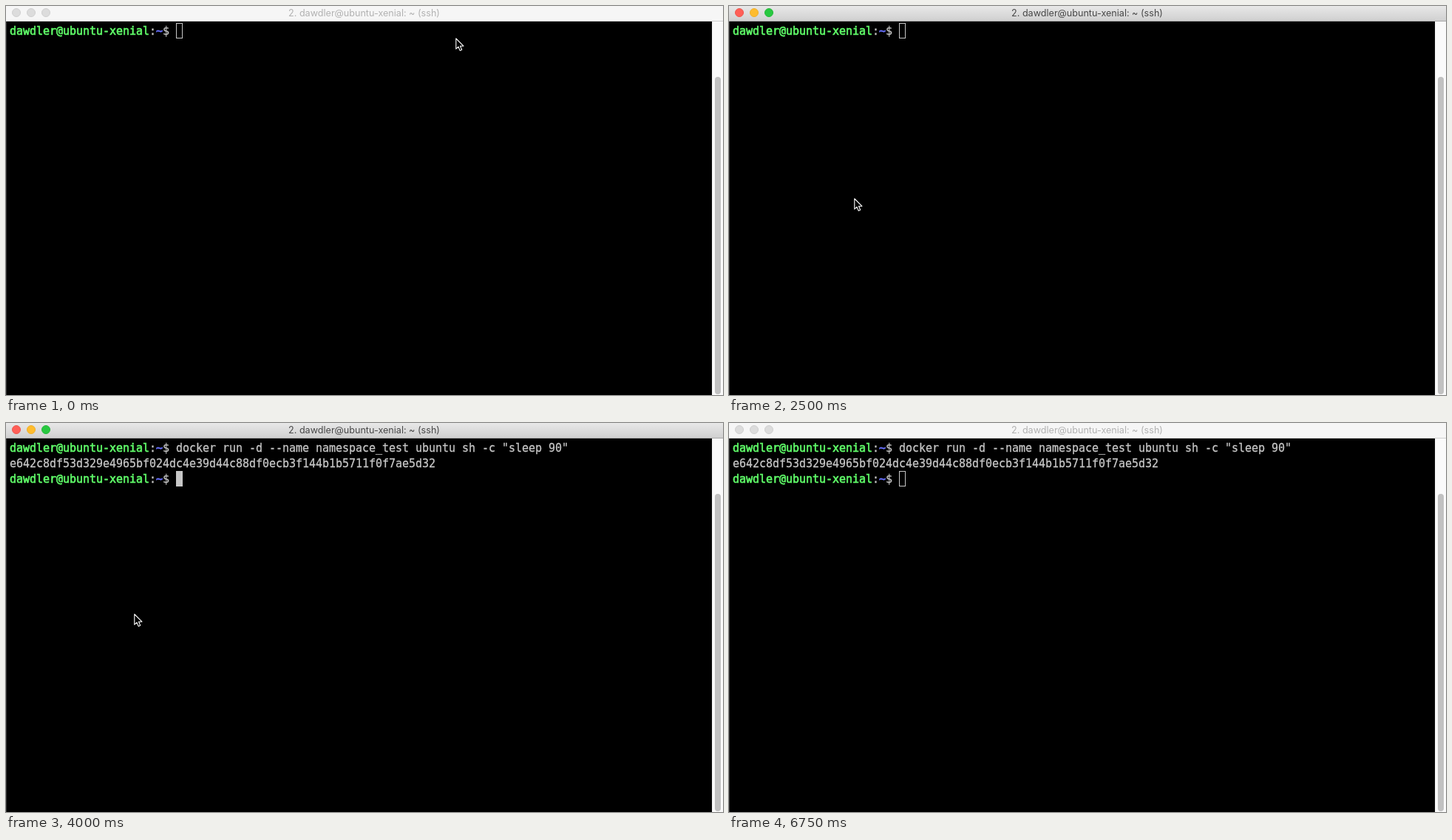
Recreate the animation shown at these times as an HTML page. Size 970 px wide and 527 px high, loop 8 s.

```html
<!DOCTYPE html>
<html lang="en">
<head>
<meta charset="utf-8">
<title>Terminal</title>
<style>
html, body { margin: 0; width: 100%; height: 100%; overflow: hidden; background: #000; }
#stage { position: relative; width: 970px; height: 527px; overflow: hidden; background: #000; }
#stage > * { position: absolute; box-sizing: border-box; }
#bar {
  left: 0; top: 0; width: 970px; height: 21px;
  background: #f6f6f6; border-bottom: 1px solid #d0d0d0;
  font: 12.6px/19px Inter, Roboto, sans-serif; text-align: center; color: #b2b2b2;
}
#bar span { position: absolute; left: 0; width: 969px; top: 0; white-space: pre; }
#bar i {
  position: absolute; top: 3px; width: 12px; height: 12px; border-radius: 50%;
  box-sizing: border-box; background: #dcdcdc; border: 1px solid #d0d0d0;
}
.active #bar { background: linear-gradient(#e8e8e8, #d0d0d0); border-color: #a8a8a8; color: #484848; }
.active #bar i { background: var(--on); border-color: var(--rim); }
#edge { left: 0; top: 21px; width: 1px; height: 506px; background: #303030; }
#track { left: 955px; top: 21px; width: 15px; height: 506px; background: #fafafa; border-left: 1px solid #ededed; }
#thumb { left: 959px; top: 96px; width: 8px; height: 430px; border-radius: 4px; background: #c1c1c1; }
.line {
  left: 5px; height: 21px; white-space: pre; color: #c7c7c7;
  font: 15px/21px "DejaVu Sans Mono", monospace; letter-spacing: -0.031px;
  -webkit-text-stroke: 0.3px;
}
.line b { color: #5ffa68; font-weight: normal; -webkit-text-stroke-width: 0.7px; }
.line .home { color: #6871ff; }
#caret { width: 9px; height: 21px; border: 1px solid #c7c7c7; }
#caret.solid { background: #c7c7c7; }
#mouse { left: 0; top: 0; width: 13px; height: 19px; overflow: visible; }
</style>
</head>
<body>
<div id="stage">
  <div id="bar">
    <i style="left:8px;--on:#ff5f57;--rim:#f0544c"></i>
    <i style="left:28px;--on:#febc2e;--rim:#f0b02a"></i>
    <i style="left:48px;--on:#28c840;--rim:#22ba37"></i>
    <span>2. dawdler@ubuntu-xenial: ~ (ssh)</span>
  </div>
  <div id="edge"></div>
  <div id="track"></div>
  <div id="thumb"></div>
  <div class="line" style="top:24px"><b>dawdler@ubuntu-xenial</b>:<b class="home">~</b>$ <span id="command">docker run -d --name namespace_test ubuntu sh -c "sleep 90"</span></div>
  <div class="line" style="top:45px" id="output">e642c8df53d329e4965bf024dc4e39d44c88df0ecb3f144b1b5711f0f7ae5d32</div>
  <div class="line" style="top:66px" id="prompt"><b>dawdler@ubuntu-xenial</b>:<b class="home">~</b>$ </div>
  <div id="caret"></div>
  <svg id="mouse" viewBox="0 0 13 19">
    <path d="M.8 1V15.2L4 12.2L6.2 17.4L8.7 16.3L6.5 11.2H10.9Z" fill="#000" stroke="#fff" stroke-width="1.1" stroke-linejoin="round"/>
  </svg>
</div>
<script>
const LOOP = 8000;
const $ = id => document.getElementById(id);

// [start ms, x, y]; no position means hidden
const mouseSteps = [
  [0, 608, 43], [250], [2250, 4, 282], [2500, 169, 260], [3000, 172, 258],
  [3750, 173, 258], [5000, 324, 209], [5250, 334, 224], [5500, 329, 223], [6000]
];

// [start ms, column, row, solid]
const caretSteps = [
  [0, 25, 0, false], [2750, 25, 0, true], [3250, 0, 1, true],
  [3500, 0, 2, true], [4000, 25, 2, true], [6750, 25, 2, false]
];

const current = (steps, t) => steps.filter(s => s[0] <= t).pop();
const show = (el, on) => { el.style.visibility = on ? "visible" : "hidden"; };

function draw(t) {
  $("stage").classList.toggle("active", t >= 2500 && t < 6750);
  show($("command"), t >= 3250);
  show($("output"), t >= 3500);
  show($("prompt"), t >= 4000);

  const [, col, row, solid] = current(caretSteps, t);
  const caret = $("caret");
  caret.style.left = 5 + col * 9 + "px";
  caret.style.top = 23 + row * 21 + "px";
  caret.classList.toggle("solid", solid);

  const [, x, y] = current(mouseSteps, t);
  show($("mouse"), x !== undefined);
  if (x !== undefined) $("mouse").style.transform = `translate(${x}px, ${y}px)`;
}

const start = performance.now();
function tick() {
  draw((performance.now() - start) % LOOP);
  requestAnimationFrame(tick);
}
tick();
</script>
</body>
</html>
```
